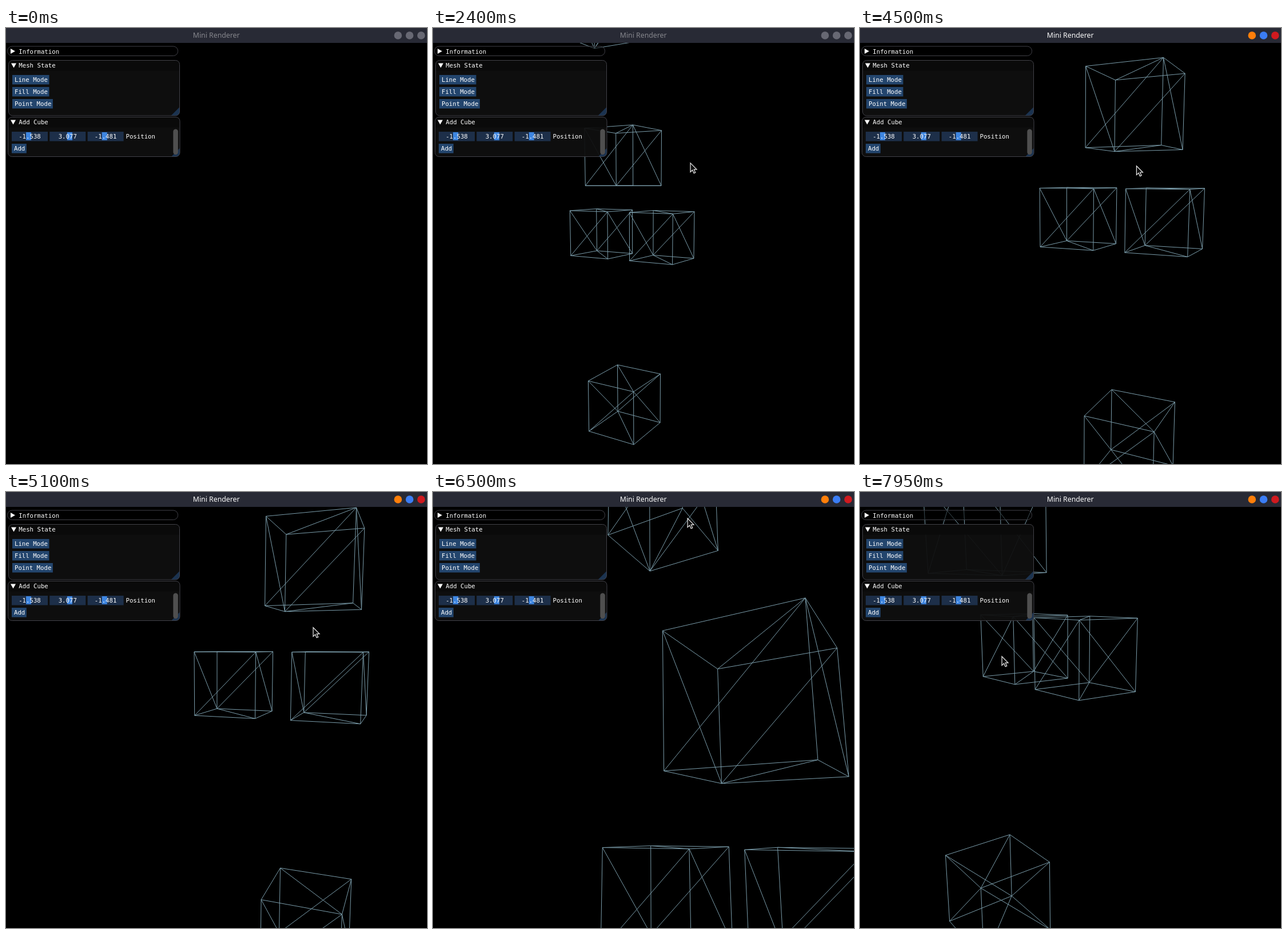
Animation, 736 px wide and 761 px high, one loop 8 s. Source, as an HTML page:

```html
<!DOCTYPE html>
<html lang="en">
<head>
<meta charset="utf-8">
<title>Mini Renderer</title>
<style>
  html, body { margin: 0; width: 100%; height: 100%; overflow: hidden; background: #000; }
  svg { display: block; width: 736px; height: 761px; }
  .ui { font: 10.7px "DejaVu Sans Mono", monospace; fill: #fff; white-space: pre; }
  .title { font: 12.3px "Noto Sans", sans-serif; text-anchor: middle; }
  .border { fill: none; stroke: #414148; }
  .button { fill: #23456d; }
  .field { fill: #1d2f49; }
  .grab { fill: #3d85e0; }
  .grip { fill: #1b3350; }
</style>
</head>
<body>
<svg viewBox="0 0 736 761">
  <rect width="736" height="761"/>
  <path id="scene" fill="none" stroke="#7a9caa" stroke-width="1"/>
  <g id="panels"></g>
  <rect width="736" height="26" fill="#282a35"/>
  <text id="title" class="title" x="367.7" y="17">Mini Renderer</text>
  <g id="dots"></g>
  <path id="cursor" d="M0 0V15.6L3.6 12.3L6.1 17.8L8.7 16.7L6.3 11.2H11Z" fill="#101010" stroke="#ececec" stroke-width="1.2"/>
</svg>
<script>
const LOOP = 8000, STEP = 50;
const ENTER = 750, SCENE_START = 800, FOCUS = 3300;
const CENTER_X = 368, CENTER_Y = 393.5, FOCAL = 887;
const DEG = Math.PI / 180, DEG_PER_PIXEL = 0.1087;

// The mouse turns the view; the keyboard moves the camera once the window has focus.
const MOUSE = [
  { t: ENTER, x: 507, y: 11 },
  { t: 1200, x: 417, y: 149 },
  { t: 1580, x: 391, y: 185 },
  { t: 2400, x: 450, y: 233.7 },
  { t: 2600, x: 453, y: 234 },
  { t: 2800, x: 453, y: 234 },
  { t: 3000, x: 424, y: 235 },
  { t: FOCUS, x: 424, y: 235 },
  { t: 3850, x: 423, y: 240.5 },
  { t: 5100, x: 537, y: 234.5 },
  { t: 5850, x: 515, y: 150 },
  { t: 6500, x: 445, y: 44 },
  { t: 7500, x: 252, y: 278 },
  { t: 7950, x: 248, y: 285 }
];
const CAMERA = [
  { t: FOCUS, x: -6.57, y: 1.05, z: -9.34 },
  { t: 3850, x: -5.775, y: 0.8, z: -8.15 },
  { t: 5100, x: -2.68, y: 0.55, z: -7.83 },
  { t: 5850, x: -3, y: 0.54, z: -6.5 },
  { t: 6500, x: -2.67, y: 0.63, z: -4.955 },
  { t: 7950, x: -6.98, y: 0.76, z: -4.44 }
];

// Monotone cubic interpolation of one property, at rest at both ends
function track(keys, prop, t) {
  const last = keys.length - 1;
  if (t <= keys[0].t) return keys[0][prop];
  if (t >= keys[last].t) return keys[last][prop];
  const secant = n => (keys[n + 1][prop] - keys[n][prop]) / (keys[n + 1].t - keys[n].t);
  const slope = n => {
    if (n === 0 || n === last) return 0;
    const a = secant(n - 1), b = secant(n);
    return a * b <= 0 ? 0 : 2 * a * b / (a + b);
  };
  const i = keys.findIndex(k => k.t > t) - 1, from = keys[i], to = keys[i + 1];
  const span = to.t - from.t, s = (t - from.t) / span, q = 1 - s;
  return q * q * ((1 + 2 * s) * from[prop] + s * span * slope(i)) +
    s * s * ((3 - 2 * s) * to[prop] - q * span * slope(i + 1));
}

// Cube centres lie on a grid
const GRID = 1.545, BACK = -1.481;
const CUBES = [
  [0, 0, 0], [-GRID, 0, 0], [0, 3 * GRID, 0],
  [-GRID, GRID, BACK], [-GRID, -2 * GRID, BACK]
];

// Corner bits are x, y, z. Face diagonals all start at corner 2 or 5.
const EDGES = [];
for (let a = 0; a < 8; a++) {
  for (let b = a + 1; b < 8; b++) {
    const differing = [1, 2, 4].filter(bit => (a ^ b) & bit).length;
    const diagonal = differing === 2 && [a, b].some(n => n === 2 || n === 5);
    if (differing === 1 || diagonal) EDGES.push([a, b]);
  }
}

const $ = id => document.getElementById(id);
const CHAR = 6.44;
const rect = (cls, x, y, w, h) => `<rect class="${cls}" x="${x}" y="${y}" width="${w}" height="${h}"/>`;
const box = (x, y, w, h, r, attrs) => `<rect x="${x}" y="${y}" width="${w}" height="${h}" rx="${r}" ${attrs}/>`;
const label = (text, x, y) => `<text class="ui" x="${x}" y="${y}">${text}</text>`;
const button = (text, x, y) =>
  rect("button", x, y, text.length * CHAR + 6.5, 16.5) + label(text, x + 4, y + 12);

function panel(name, x, y, w, h) {
  const r = 7, right = x + w, bottom = y + h;
  return box(x, y, w, h, r, 'fill="#0f0f0f" fill-opacity=".94"') +
    `<path d="M${x} ${y + 18}V${y + r}a${r} ${r} 0 0 1 ${r} ${-r}H${right - r}a${r} ${r} 0 0 1 ${r} ${r}V${y + 18}Z" fill="#0a0a0a"/>` +
    `<path class="grip" d="M${right} ${bottom - 15}V${bottom - r}a${r} ${r} 0 0 1 ${-r} ${r}H${right - 15}Z"/>` +
    box(x, y, w, h, r, 'class="border"') +
    `<path d="M${x + 4.5} ${y + 5}h9l-4.5 8Z" fill="#fff"/>` + label(name, 22.3, y + 12.8);
}

function slider(value, i) {
  const x = 10 + 66.3 * i, text = value.toFixed(3);
  return rect("field", x, 181, 63, 16.5) + rect("grab", x + 26.9 + 1.2 * value, 182, 9, 13.8) +
    label(text, x + (63 - text.length * CHAR) / 2, 193);
}

$("panels").innerHTML =
  box(2.5, 32, 298, 16.5, 8, 'fill="#000" fill-opacity=".51"') +
  box(2.5, 32, 298, 16.5, 8, 'class="border"') +
  '<path d="M8 36V45L16 40.5Z" fill="#fff"/>' + label("Information", 22.3, 44.5) +
  panel("Mesh State", 4.5, 56.5, 299, 96.5) +
  ["Line Mode", "Fill Mode", "Point Mode"].map((text, i) => button(text, 11, 82 + 21 * i)).join("") +
  panel("Add Cube", 3.5, 155.5, 300.5, 69) +
  [-1.538, 3.077, -1.481].map(slider).join("") +
  label("Position", 209.5, 193) + button("Add", 10, 202) +
  box(292.3, 176.5, 8.5, 44.5, 4.2, 'fill="#4f4f4f"');

$("dots").innerHTML = [0, 1, 2].map(i => `<circle cx="${685.3 + 20.25 * i}" cy="13" r="6.8"/>`).join("");

function wireframe(mouse, eye) {
  const yaw = (34 - DEG_PER_PIXEL * (mouse.x - 417)) * DEG;
  const pitch = (1.58 - DEG_PER_PIXEL * (mouse.y - 149)) * DEG;
  const sinYaw = Math.sin(yaw), cosYaw = Math.cos(yaw);
  const sinPitch = Math.sin(pitch), cosPitch = Math.cos(pitch);
  const project = point => {
    const [x, y, z] = point.map((v, axis) => v - eye[axis]);
    const side = z * sinYaw - x * cosYaw, ahead = z * cosYaw + x * sinYaw;
    const scale = FOCAL / Math.max(0.1, ahead * cosPitch + y * sinPitch);
    const up = y * cosPitch - ahead * sinPitch;
    return `${(CENTER_X + side * scale).toFixed(1)} ${(CENTER_Y - up * scale).toFixed(1)}`;
  };
  return CUBES.map(cube => {
    const corners = Array.from({ length: 8 }, (_, n) =>
      project(cube.map((v, axis) => v + (n >> axis & 1) - 0.5)));
    return EDGES.map(([a, b]) => `M${corners[a]}L${corners[b]}`).join("");
  }).join("");
}

function render(time) {
  const t = Math.floor(time % LOOP / STEP) * STEP;
  const mouse = { x: track(MOUSE, "x", t), y: track(MOUSE, "y", t) };
  const eye = ["x", "y", "z"].map(axis => track(CAMERA, axis, t));
  $("scene").setAttribute("d", t < SCENE_START ? "" : wireframe(mouse, eye));
  $("cursor").setAttribute("transform", `translate(${mouse.x} ${mouse.y + 2})`);
  $("cursor").setAttribute("visibility", t < ENTER ? "hidden" : "visible");
  const focused = t >= FOCUS;
  const colors = focused ? ["#ff7f0a", "#3b7df5", "#d01a1f"] : Array(3).fill("#676873");
  $("title").setAttribute("fill", focused ? "#fafafa" : "#86878d");
  [...$("dots").children].forEach((dot, i) => dot.setAttribute("fill", colors[i]));
}

const start = performance.now();
function tick() {
  render(performance.now() - start);
  requestAnimationFrame(tick);
}
tick();
</script>
</body>
</html>
```
